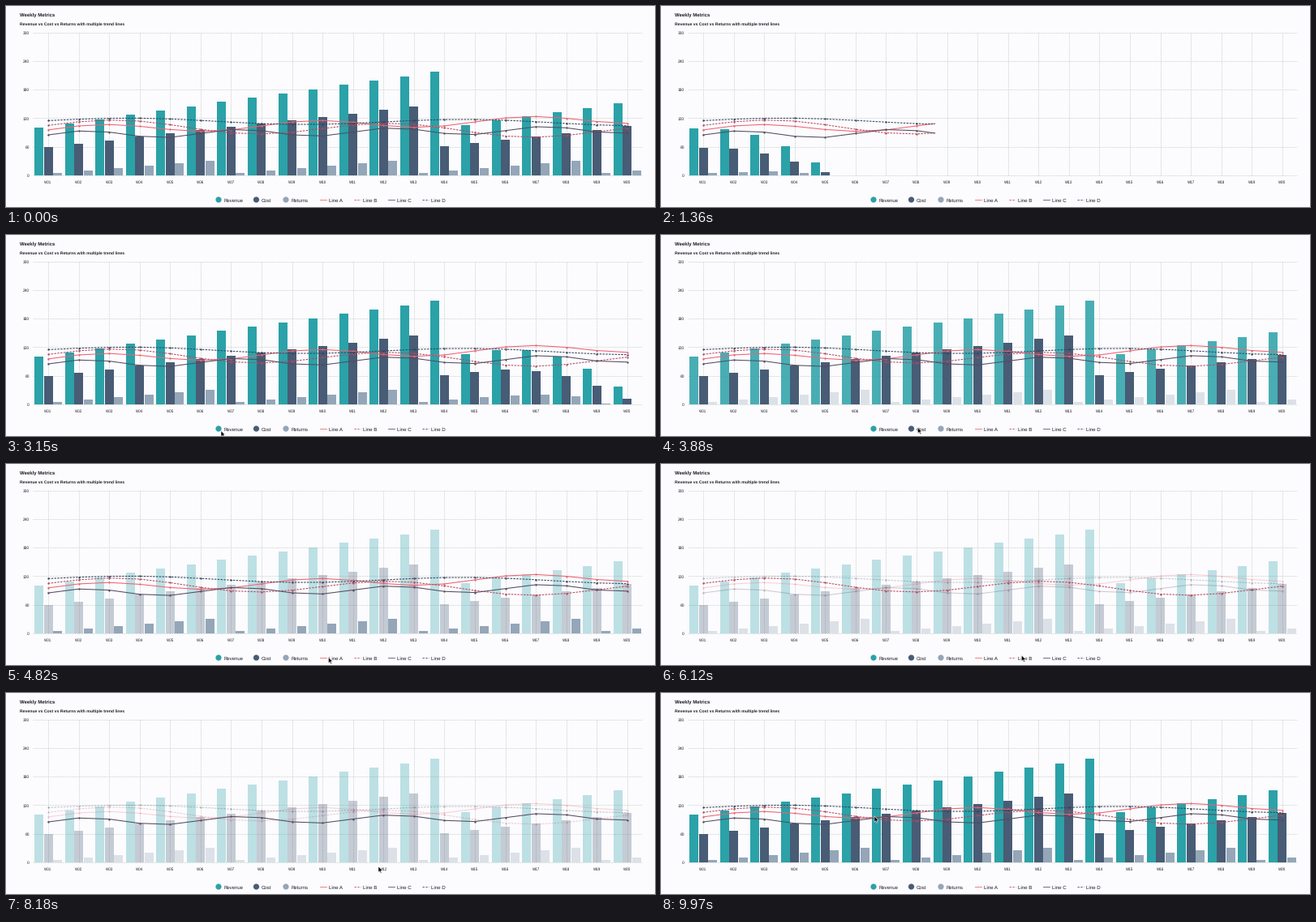
A matplotlib script for the animation above (10 s loop, 800 by 248 pixels).

```python
import numpy as np
import matplotlib.pyplot as plt
from matplotlib.animation import FuncAnimation
from matplotlib.collections import LineCollection, PolyCollection
from matplotlib.patches import Circle, Polygon

W, H, DPI = 800, 248, 100
PX = 72 / DPI
LOOP, STEP = 10000, 40
BG, INK = "#fcfbfe", "#1c1c22"

plt.rcParams.update({
    "font.family": "Liberation Sans",
    "text.hinting": "none",
    "lines.scale_dashes": False,
    "lines.dash_capstyle": "butt",
})

fig = plt.figure(figsize=(W / DPI, H / DPI), dpi=DPI, facecolor=BG)
ax = fig.add_axes([0, 0, 1, 1])
ax.set_xlim(0, W)
ax.set_ylim(H, 0)
ax.axis("off")

# Layout and data
idx = np.arange(20)
centers = 52 + 37.57 * idx
BASE, TOP = 209, 32.7
BAR_W, BAR_PITCH = 11, 11.5


def to_y(value):
    return BASE - np.asarray(value) * (BASE - TOP) / 300


def wave(base, slope, amp, period):
    return base + slope * idx + amp * np.sin(2 * np.pi * idx / period)


# name, colour, values, legend x
BARS = [
    ("Revenue", "#2aa2a8", 100 + idx * 9 % 120, 262),
    ("Cost", "#485c75", 60 + idx * 7 % 90, 308.5),
    ("Returns", "#94a6b8", 5 + idx * 5 % 30, 345),
]
# name, colour, dashed, values
LINES = [
    ("Line A", "#ef6270", False, wave(95.5, 1.2, 9.2, 7)),
    ("Line B", "#b5495b", True, wave(105, -0.75, 13, 9)),
    ("Line C", "#544c60", False, wave(85, 0.6, 8, 5)),
    ("Line D", "#34445c", True, wave(115, -0.25, 6, 11)),
]

# Timing in ms
RELOAD, GROW, LAG, SERIES_LAG = 820, 600, 116, 50
SWEEP_START, SWEEP = 900, 1150
FADE_IN, FADE_OUT, MOVE = 70, 350, 400

# Pointer stops: time, x, y, highlighted series
STOPS = [
    (2480, 250, 249, None),
    (3250, 270, 239, 0),
    (3810, 316.5, 237.5, 1),
    (4330, 353, 239, 2),
    (4800, 397.5, 238.5, 3),
    (5600, 444.5, 236, 4),
    (6620, 484, 236, 5),
    (7250, 522, 237, 6),
    (7820, 492, 235, 5),
    (8160, 459, 214, None),
    (9300, 263, 152, None),
]


def label(x, y, s, size, ha="left", weight="normal"):
    ax.text(x, y, s, fontsize=size * PX, color=INK, ha=ha,
            va="center_baseline", weight=weight, zorder=6)


def dash_args(dashed):
    return {"dashes": (2.4 * PX, 1.4 * PX)} if dashed else {}


# Titles, grid and axis labels
label(17, 10.3, "Weekly Metrics", 5.95, weight="bold")
label(17, 22.2, "Revenue vs Cost vs Returns with multiple trend lines",
      5.1, weight="bold")

levels = np.arange(0, 301, 60)
grid = [[(33, y), (784, y)] for y in to_y(levels)]
grid += [[(x, TOP), (x, BASE)] for x in centers]
ax.add_collection(LineCollection(
    grid, colors="#cdd8cf", linewidths=0.8 * PX,
    linestyles=[(0, (2 * PX, 1 * PX))], zorder=1))
for v in levels:
    label(28.9, to_y(v) + 0.3, str(v), 4.9, "right")
for i, x in enumerate(centers):
    label(x, 216.7, f"W{i + 1:02d}", 4.5, "center")

# Legend
for name, color, _, x in BARS:
    ax.add_patch(Circle((x, 239), 3.6, fc=color, ec="none"))
    label(x + 6.6, 239.4, name, 6)
for k, (name, color, dashed, _) in enumerate(LINES):
    x = 386.5 + 42 * k
    ax.plot([x, x + 8.6], [239, 239], color=color, lw=0.8 * PX,
            **dash_args(dashed))
    label(x + 11, 239.4, name, 6.1)

# Animated parts
bar_sets = [
    ax.add_collection(PolyCollection([], facecolors=color,
                                     edgecolors="none", zorder=2))
    for _, color, *_ in BARS
]
curves = [
    ax.plot([], [], color=color, lw=1.05 * PX, marker="o", ms=2.3 * PX,
            mew=0, zorder=3, **dash_args(dashed))[0]
    for _, color, dashed, _ in LINES
]
ARROW = np.array([(0, 0), (0, 7.3), (1.7, 5.7), (2.8, 8.3), (4, 7.8),
                  (2.9, 5.3), (5.1, 5.2)])
pointer = ax.add_patch(Polygon(ARROW, fc="black", ec="white",
                               lw=0.5 * PX, zorder=9))


def goal_opacity(series, focus):
    if focus is None or series == focus:
        return 1.0
    if series < len(BARS):
        return 0.3
    return 1.0 if focus < len(BARS) else 0.28


def opacity(series, t):
    value = 1.0
    ends = [stop[0] for stop in STOPS[1:]] + [LOOP]
    for (start, _, _, focus), end in zip(STOPS, ends):
        if t < start:
            break
        goal = goal_opacity(series, focus)
        span = FADE_IN if goal > value else FADE_OUT
        value += (goal - value) * min(1, (min(t, end) - start) / span)
    return value


def pointer_at(t):
    """Rest at each stop, then glide to arrive at the next one on time."""
    x, y = STOPS[0][1:3]
    for (t0, x0, y0, _), (t1, x1, y1, _) in zip(STOPS, STOPS[1:]):
        if t < t0:
            break
        move = min(MOVE, t1 - t0)
        p = np.clip((t - t1 + move) / move, 0, 1)
        p = p * p * (3 - 2 * p)
        x, y = x0 + (x1 - x0) * p, y0 + (y1 - y0) * p
    return x, y


def growth(t, k):
    if t < RELOAD:
        return np.ones(len(idx))
    p = (t - RELOAD - LAG * idx - SERIES_LAG * k) / GROW
    return np.sin(np.pi / 2 * np.clip(p, 0, 1))


def bar_shapes(values, k):
    left = centers + (k - 1) * BAR_PITCH - BAR_W / 2
    return [[(x, BASE), (x, y), (x + BAR_W, y), (x + BAR_W, BASE)]
            for x, y in zip(left, to_y(values))]


def sweep_front(t):
    if t < RELOAD:
        return centers[-1]
    p = np.clip((t - SWEEP_START) / SWEEP, 0, 1)
    return centers[0] + (centers[-1] - centers[0]) * p


def update(i):
    t = i * STEP
    for k, (bars, (_, _, values, _)) in enumerate(zip(bar_sets, BARS)):
        bars.set_verts(bar_shapes(values * growth(t, k), k))
        bars.set_alpha(opacity(k, t))

    front = sweep_front(t)
    count = int(np.sum(centers <= front + 1e-6))
    hidden = RELOAD <= t < SWEEP_START
    for k, (curve, (*_, values)) in enumerate(zip(curves, LINES), len(BARS)):
        ys = to_y(values)
        curve.set_data(np.append(centers[:count], front),
                       np.append(ys[:count], np.interp(front, centers, ys)))
        curve.set_markevery(list(range(count)))
        curve.set_visible(not hidden)
        curve.set_alpha(opacity(k, t))

    pointer.set_visible(t >= STOPS[0][0])
    pointer.set_xy(ARROW + pointer_at(t))
    return [*bar_sets, *curves, pointer]


anim = FuncAnimation(fig, update, frames=LOOP // STEP, interval=STEP,
                     repeat=True, repeat_delay=0)
plt.show()
```
